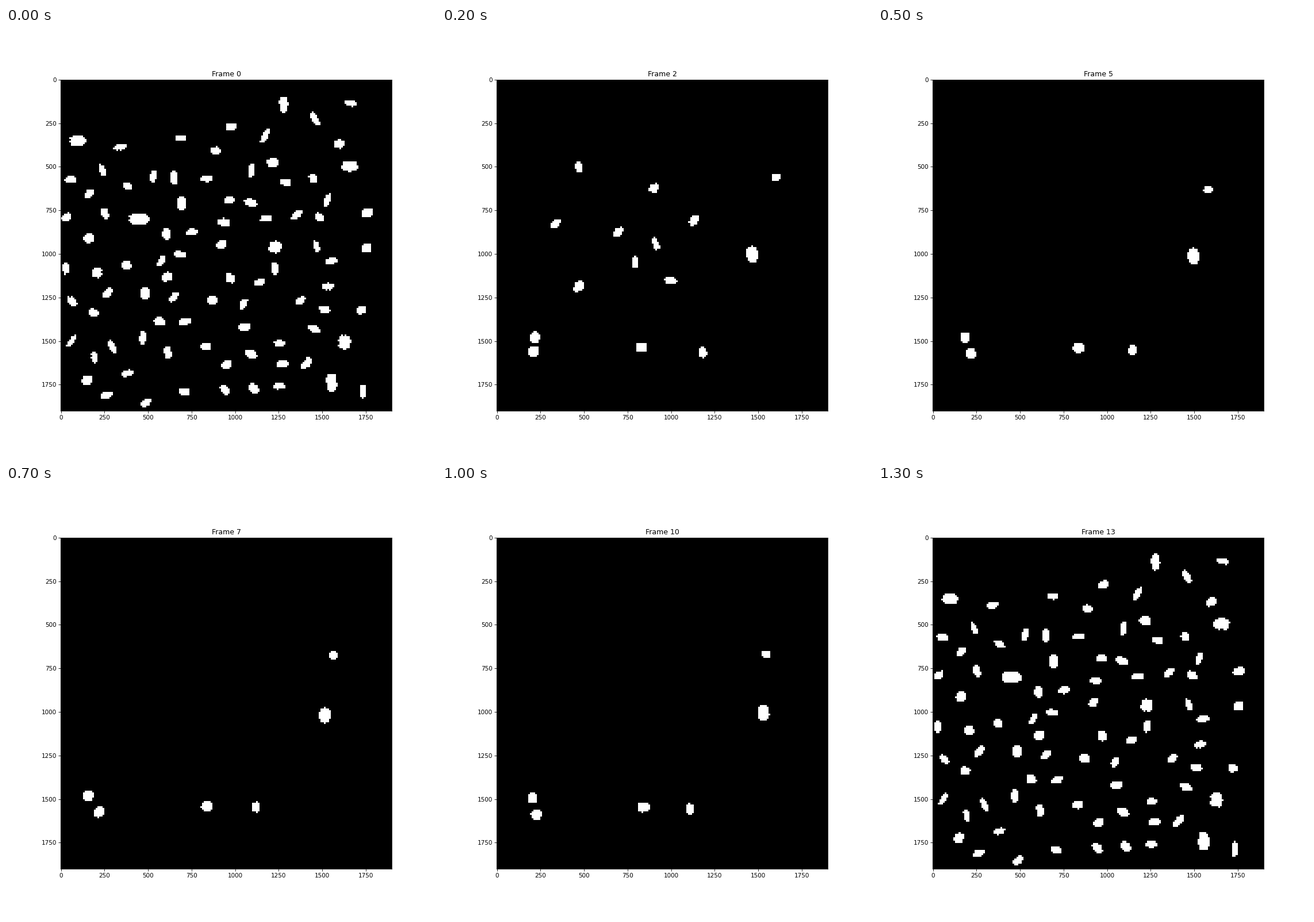
Recreate the animation shown at these times as a matplotlib script. Size 748x748 px, loop 1.4 s.

```python
import matplotlib.pyplot as plt
import numpy as np
from matplotlib.animation import FuncAnimation

SIZE = 190    # grid cells per side
SCALE = 10    # axis units per grid cell
FRAMES = 14
gy, gx = np.mgrid[:SIZE, :SIZE] + 0.5

# Clumps in the resting crowd: x, y, width, height
CLUMPS = [
    (128, 14, 5, 9), (10, 35, 9, 6), (166, 49.5, 9, 6), (65, 56, 4, 8),
    (69.5, 71, 5, 8), (45, 80, 11, 6), (123, 96, 7, 7), (48.5, 122.5, 5, 7),
    (163, 150.5, 7, 8), (155.5, 174, 6, 10),
]

# Followed cells: start, turning point and end of the path, then the size
TURNS = [1, 7, 12]
PATHS = [
    ((161, 53.5), (156.5, 67.5), (153.5, 66.5), (5, 4.5)),
    ((145.5, 100), (151.5, 102), (154, 99.5), (6.5, 9)),
    ((23, 147.5), (16, 148), (23.5, 150), (5.5, 6)),
    ((21, 155.5), (22, 157.5), (23, 160), (6, 6)),
    ((83, 153.5), (84, 154), (84.5, 155), (6.5, 5.5)),
    ((119.5, 157), (112, 154.5), (110.5, 156.5), (4.5, 6)),
]


def scatter(rng, count, placed, inside):
    """Spread leaning cells over a region, away from those already placed."""
    points = [cell[:2] for cell in placed]
    cells = []
    while len(cells) < count:
        tries = [p for p in rng.uniform(3, SIZE - 4, (12, 2)) if inside(*p)]
        if not tries:
            continue
        gaps = [np.hypot(*(np.array(points) - p).T).min() for p in tries]
        x, y = tries[np.argmax(gaps)]
        width = rng.uniform(3.2, 7)
        height = np.clip(27 / width, 3.5, 7) * rng.uniform(0.85, 1.15)
        points.append((x, y))
        cells.append((x, y, width, height, rng.uniform(-0.5, 0.6)))
    return cells


def followed(frame):
    cells = []
    for *path, size in PATHS:
        x, y = (np.interp(frame, TURNS, axis) for axis in zip(*path))
        cells.append((x, y, *size))
    return cells


def crowd_area(x, y):
    return x < 176 and y > 45 - 0.2 * x


def brief_area(x, y):
    return 15 < x < 178 and y > 45


CROWD = CLUMPS + scatter(np.random.default_rng(4), 78, CLUMPS, crowd_area)
BRIEF = scatter(np.random.default_rng(8), 20, followed(1), brief_area)
BRIEF.sort(key=lambda cell: np.hypot(cell[0] - 72, cell[1] - 95))


def visible_cells(frame):
    if frame in (0, FRAMES - 1):
        return CROWD
    # The brief cells die out towards the middle
    fade = 0.45 ** (frame - 1)
    return followed(frame) + BRIEF[:int(len(BRIEF) * fade)]


def blob(x, y, width, height, lean=0):
    dy = gy - y
    dx = gx - x + lean * dy
    return np.abs(2 * dx / width) ** 2.6 + np.abs(2 * dy / height) ** 2.6


def mask(frame):
    edge = np.random.default_rng(frame).uniform(0.85, 1.25, (SIZE, SIZE))
    return np.any([blob(*cell) < edge for cell in visible_cells(frame)], axis=0)


fig, ax = plt.subplots(figsize=(10, 10), dpi=74.8)
span = SIZE * SCALE - 0.5
image = ax.imshow(mask(0), cmap="gray", vmin=0, vmax=1,
                  interpolation="nearest", extent=(-0.5, span, span, -0.5))
title = ax.set_title("Frame 0")


def update(frame):
    image.set_data(mask(frame))
    title.set_text(f"Frame {frame}")
    return image, title


animation = FuncAnimation(fig, update, frames=FRAMES, interval=100,
                          repeat=True, repeat_delay=0)
plt.show()
```
